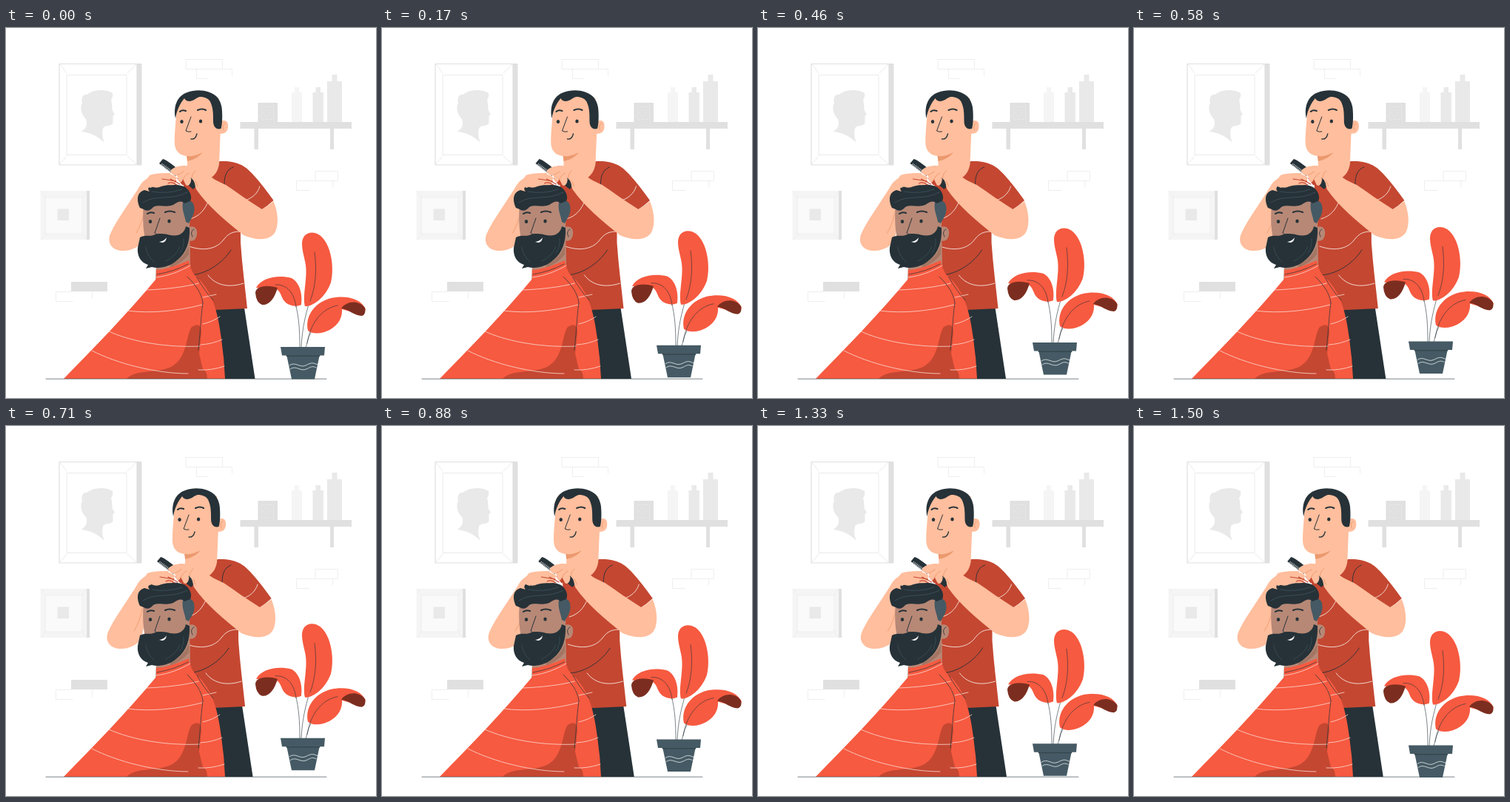
These frames come from a looping animation (500x500 px, 1.54 s). An HTML page with a canvas:

```html
<!DOCTYPE html>
<html lang="en">
<head>
<meta charset="utf-8">
<title>Barber shop</title>
<style>
html, body { margin: 0; width: 100%; height: 100%; overflow: hidden; background: #fff; }
canvas { display: block; width: 500px; height: 500px; }
</style>
</head>
<body>
<canvas id="stage" width="500" height="500"></canvas>
<script>
const ctx = document.getElementById('stage').getContext('2d');
const LOOP = 1540;
const PHASE = 45;
const RED = '#f65a40', SHIRT = '#c44731', MAROON = '#7b2e20';
const SKIN = '#ffbe9d', CREASE = '#eb996e', BROWN = '#b78876';
const DARK = '#263238', SLATE = '#455a64', WHITE = '#fff';
const GREY = '#e0e0e0', MID = '#e9e9e9', PALE = '#f5f5f5', FAINT = '#ebebeb';

const paths = new Map();
function shape(d) {
  if (!paths.has(d)) paths.set(d, new Path2D(d));
  return paths.get(d);
}
function fill(color, d) {
  ctx.fillStyle = color;
  ctx.fill(shape(d));
}
function line(color, width, d) {
  ctx.strokeStyle = color;
  ctx.lineWidth = width;
  ctx.stroke(shape(d));
}
function box(color, x1, y1, x2, y2) {
  ctx.fillStyle = color;
  ctx.fillRect(x1, y1, x2 - x1, y2 - y1);
}
function oval(color, x, y, rx, ry) {
  ctx.fillStyle = color;
  ctx.beginPath();
  ctx.ellipse(x, y, rx, ry, 0, 0, Math.PI * 2);
  ctx.fill();
}
function shifted(dx, dy, draw) {
  ctx.save();
  ctx.translate(dx, dy);
  draw();
  ctx.restore();
}

function drawWall() {
  // Portrait frame
  box(GREY, 177, 48, 183.5, 185.5);
  line(GREY, 1.2, 'M72 48.5H177V185H72Z');
  line(FAINT, 1, 'M82.5 63.5H163V171.5H82.5ZM73 49L82 61M176 49L164 61M73 184L82 173M176 184L164 173');
  fill(MID, 'M116 86C125 83 137 83 144 88Q145 94 142 97C144 104 143 108 144 112L147 117L144.5 119V127C144 133 137 131 132 134C129 139 130 148 133 155C124 146 113 141 101 140C108 137 111 130 108 123C101 116 100 108 103 101C101 95 104 89 109 90Z');

  // Small frame
  box(PALE, 46.5, 220, 109, 286);
  box(GREY, 109, 220, 113, 286);
  box('#fafafa', 53.5, 229, 103, 278);
  line(FAINT, .7, 'M53.5 229H103V278H53.5ZM47 220L54 229M109 220L103 229M47 286L54 278M109 286L103 278');
  box(MID, 69.5, 244.5, 85, 260);

  // Bricks
  line(FAINT, .8, 'M243.5 42.5H292.5V55.5H243.5ZM257.5 55V68.5H273M292 55.5H305.5V64');
  line(FAINT, .8, 'M418.5 193.5H448.5V206.5H418.5ZM418 206.5H392.5V219.5H410M441.5 206V215');
  box(GREY, 88, 343, 137, 356);
  line(FAINT, .8, 'M88 356.5H67.5V369.5H90M116.5 356V366');

  // Shelf
  box(GREY, 316.5, 127, 467, 136);
  box(GREY, 335.5, 136, 341, 164);
  box(GREY, 438, 136, 443, 164);
  box(GREY, 340.5, 101, 367, 127);
  line(FAINT, .6, 'M345.5 106.5H361.5V123.5H345.5ZM348 115a4.5 4.5 0 1 0 9 0a4.5 4.5 0 1 0-9 0');
  box(PALE, 386, 87, 400, 127);
  box(PALE, 390, 80, 396, 87);
  box(MID, 414.5, 87, 429, 127);
  box(MID, 418.5, 80, 425, 87);
  box(MID, 434, 72, 454, 127);
  box(MID, 440.5, 63, 447.5, 72);
}

function drawBarberHead() {
  fill(SKIN, 'M290 126C297 123 300.5 127 300 133C300 140 296 143 289 143Z');
  line(CREASE, .8, 'M296 129Q291 131 294 138');
  fill(SKIN, 'M231 100C230 125 227 145 228 158C230 172 242 174 252 173C268 170 284 158 290 137L288 95L255 88Z');
  fill(DARK, 'M229 122C226 108 230 92 245 87C258 82 276 84 285 93C290 99 292 106 292 113C292.5 122 292 131 290.5 136C284 138 280 133 280 126C280 117 280 109 277 102C275 95 268 93 262 93C257 94 255 98 248 99Q243 99 241 95C236 101 231 110 229 122Z');
  line(DARK, 2.1, 'M235 113Q238 110 243 112M259 111Q265 108 270 111');
  oval(DARK, 237.5, 126.5, 2.2, 2.5);
  oval(DARK, 263, 126, 2.2, 2.5);
  line(DARK, 1, 'M250 120L243 139Q246 141 250 140');
  line(DARK, 1.3, 'M250 150Q256 151 258 143');
}

function drawBarberBody() {
  fill(DARK, 'M262 378H322L336.5 474H270Z');
  fill(SHIRT, 'M240 212L289 180C312 179 323 186 333 197C344 209 353 221 361.5 233Q354 240 346 245L317 264L317 290C319 320 323 350 326 379L260 382L240 330Z');
  line(DARK, .9, 'M295 211C295 198 299 191 307 188M250 334C273 332 294 316 304 300');
  line('#f7e8e3', .9, 'M320 234C332 231 340 224 343 214M249 258C263 254 269 244 273 235M247 295C270 303 286 297 294 286C301 277 307 275 317 275M273 334C284 349 303 351 321 345');

  fill(SKIN, 'M245 160V202C262 212 284 207 288 184L290 134Z');
  fill(CREASE, 'M244 173Q256 173 267 166Q260 177 245 180Z');
  drawBarberHead();

  // Far arm
  fill(SKIN, 'M222 196C200 196 187 203 181 213C170 232 150 258 141 278C136 290 143 300 156 301C168 302 178 296 185 290L194 250L205 225L230 214Z');
  line(CREASE, .8, 'M187 247Q184 264 176 277');
}

function drawComb() {
  fill(DARK, 'M207 183L212 177Q217 178 234 192L229 200Z');
  ctx.save();
  ctx.lineCap = 'butt';
  ctx.setLineDash([.9, 1.2]);
  line('#cfd4d6', 3.6, 'M210 184.200L229 197.500');
  ctx.restore();
  fill(DARK, 'M242 200L256 207Q258 213 253 218L247 213Z');
}

function drawBarberHands() {
  fill(SKIN, 'M194 199C206 195 222 195 231 202L228 212C215 213 204 211 195 216L185 212Z');
  fill(SHIRT, 'M231 203L240 204L249 214L238 212Z');
  line(SHIRT, 1.1, 'M211 204L230 207M219 210Q224 207 231 212M222 204L235 211');
  drawComb();

  // Near arm
  fill(SKIN, 'M361.5 234C368 250 369 267 363 277C355 288 337 287 321 280C298 262 272 240 257 218L252 203L265 191C278 204 288 208 297 212C312 222 328 234 346 245Q355 240 361.5 234Z');
  fill(SKIN, 'M222 193C228 186 240 185 250 187C260 187 268 191 274 201L263 217Q256 216 255 207L250 202C251 211 246 215 243 212L239 204Q237 211 233 207L231 199Q224 200 222 193Z');
  line(CREASE, .9, 'M231 199L240 194M239 205Q242 198 247 196M251 204Q251 196 256 193M256 207L259 214');
  line(DARK, 1, 'M250 203Q256 208 255 216');
}

function drawClientHead() {
  fill(BROWN, 'M186 238C184 260 186 275 188 285L203 316L202 342L249 320L248 268L250 235L210 225Z');
  fill('#a27564', 'M222 320Q241 311 247 294V306Q239 317 222 324Z');
  fill(BROWN, 'M246 269C256 266 259 272 258 279C257 287 252 289 246 287Z');
  line(DARK, .8, 'M254 272Q248 275 252 282');
  fill(SLATE, 'M239 235C246 231 254 233 254.5 243C255 253 250 257 247 264L243 262C242 254 237 246 239 235Z');
  fill(DARK, 'M181 243C176 232 177 222 187 219L194 221Q190 217 195 213Q202 218 210 214C223 210 234 211 242 215C249 220 252 228 249 234L241 237C237 232 232 235 226 239C217 243 207 238 199 242C195 247 190 248 186 245Z');
  line(SLATE, .7, 'M185 236C203 224 223 234 245 222M197 221Q218 225 238 218');

  fill(DARK, 'M181 283C188 279 193 282 199 280C207 277 215 278 222 280C233 282 241 278 243 268L248 270C249 288 244 304 231 314C222 322 208 326 197 323L189 325L192 320C182 317 177 308 178 297Z');
  line(SLATE, .6, 'M189 296Q191 309 200 316M216 315Q229 309 235 296M240 285Q241 296 235 304');
  fill(WHITE, 'M207 289Q214 288 217 283Q216 290 211 290Z');
  line(DARK, 2.1, 'M191 251Q195 248 200 250M215 249Q221 246 228 249');
  oval(DARK, 195, 261.5, 2.2, 2.5);
  oval(DARK, 220.5, 261, 2.2, 2.5);
  line(DARK, 1, 'M208 257L201 277Q204 280 209 279');
}

function drawCape() {
  fill(RED, 'M203 327C218 326 233 320 247 314C249 324 252 332 258 337C280 356 287 388 291 420Q295 447 296 474H78C119 432 164 386 203 339Z');
  fill(SHIRT, 'M163 474C175 461 203 467 223 458C246 446 243 414 251 404Q264 396 264 412L261 440L266 461Q272 463 272 474Z');
  line('#fbded7', .8, 'M203 337C220 335 235 329 249 321M190 354C216 353 242 350 260 345M164 382C194 386 230 383 265 374M139 410C172 425 220 432 262 430M116 436C151 454 204 467 246 467M266 364L284 360M266 400Q279 397 289 390M263 428Q279 427 292 421M260 462Q278 463 295 457');
  line(DARK, .7, 'M204 333Q227 329 246 319M245 336C257 348 264 358 266 371M266 371C263 395 262 418 260 435M258 337Q266 352 280 368');
}

function drawPlant() {
  line(DARK, .6, 'M397 432C397 409 396 391 391 372M399 432C400 408 404 390 411 367M405 432Q408 417 416 403');
  fill(RED, 'M400 292C400 277 413 273 424 280C440 292 444 325 439 344C431 366 413 377 404 376C400 360 409 335 404 315C402 306 400 299 400 292Z');
  fill(RED, 'M338 351C345 338 366 333 386 338C397 344 401 360 399 374C391 378 379 375 374 366C370 357 368 352 362 353Z');
  fill(RED, 'M408 409C403 386 422 366 446 364C465 362 481 368 486 380Q483 388 475 386L454 380C455 392 448 405 430 411Q416 415 408 409Z');
  fill(MAROON, 'M337 358C337 350 350 346 367 351C363 365 356 375 346 374Q338 371 337 358Z');
  fill(MAROON, 'M453 379C460 369 476 367 485 378Q487 387 481 389C470 389 464 380 453 379Z');
  line(DARK, .6, 'M417 303C420 326 419 348 411 369M364 347C380 346 390 359 392 377M407 426C411 400 426 379 448 375');
  fill(SLATE, 'M379 441H424L417 474.5H386Z');
  fill('#37474f', 'M378.5 442H424.5L424 444H379Z');
  fill(SLATE, 'M371 431H431L430 442.5H373Z');
  line('#e8ecee', .8, 'M383 456C391 450 397 460 405 456S414 452 421 455M384 461C392 455 398 465 406 461S414 457 419 459');
}

// Piecewise-linear shake, one stop per tenth of the loop
const SHAKE = [0, -1, 2, -4, 4, -4, 4, -4, 2, -1, 0];
function shakeAt(p) {
  const i = Math.floor(p * 10);
  return SHAKE[i] + (SHAKE[i + 1] - SHAKE[i]) * (p * 10 - i);
}

function render(now) {
  const p = ((now + PHASE) % LOOP) / LOOP;
  const sway = shakeAt(p) + .3;
  const lift = 10 * (1 - Math.abs(1 - 2 * p));

  ctx.fillStyle = WHITE;
  ctx.fillRect(0, 0, 500, 500);
  drawWall();
  shifted(sway, 0, drawBarberBody);
  drawClientHead();
  drawCape();
  shifted(sway, 0, drawBarberHands);
  line(DARK, .6, 'M54 474.2H433');
  shifted(0, .5 - lift, drawPlant);
}

ctx.lineCap = 'round';
ctx.lineJoin = 'round';
let start;
function tick(now) {
  start ??= now;
  render(now - start);
  requestAnimationFrame(tick);
}
render(0);
requestAnimationFrame(tick);
</script>
</body>
</html>
```
